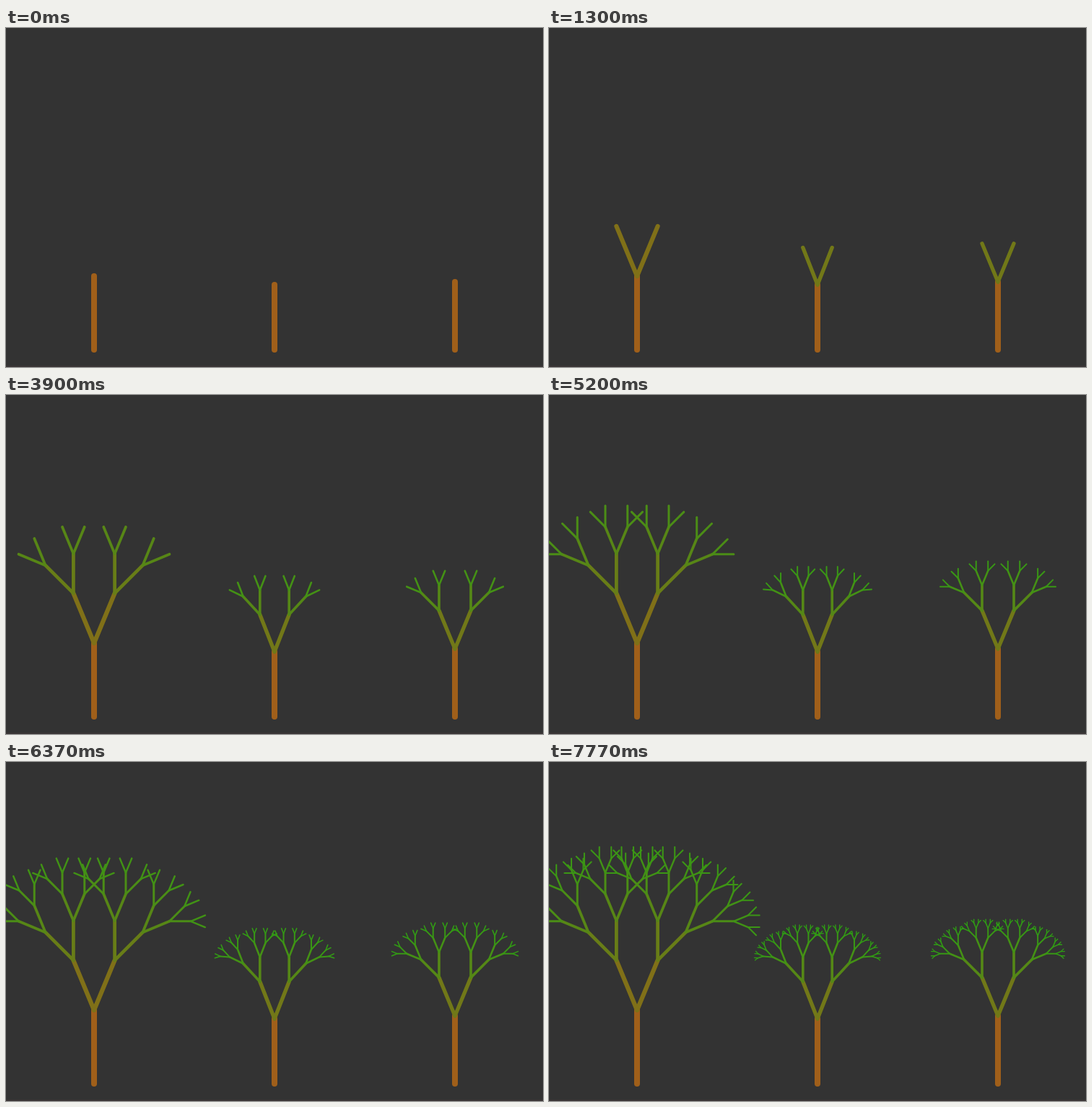
These frames come from a looping animation (744 by 470 pixels, 8000 ms). An HTML page with a canvas:

```html
<!DOCTYPE html>
<html>
<head>
<meta charset="utf-8">
<style>
html, body { margin: 0; width: 100%; height: 100%; overflow: hidden; background: #333; }
canvas { display: block; }
</style>
</head>
<body>
<canvas id="stage" width="744" height="470"></canvas>
<script>
const ctx = document.getElementById('stage').getContext('2d');
const LOOP = 8000;
const GROWTH = [0, 1300, 2600, 3900, 5200, 6370, 7770];
const TREES = [
  { x: 122, length: 102, ratio: 0.733, angle: 22.5 },
  { x: 372, length: 90, ratio: 0.615, angle: 21.4 },
  { x: 622, length: 94, ratio: 0.612, angle: 22.5 }
];

function drawTree({ x, length, ratio, angle }, levels) {
  const turn = angle * Math.PI / 180;
  let buds = [{ x, y: 446, a: 0 }];
  let size = 1; // branch length relative to the trunk
  for (let i = 0; i < levels; i++) {
    const next = [];
    ctx.strokeStyle = `rgb(${40 + 120 * size}, ${160 - 65 * size}, ${20 + 6 * size})`;
    ctx.lineWidth = 1 + 7 * size;
    for (const b of buds) {
      const tx = b.x + length * size * Math.sin(b.a);
      const ty = b.y - length * size * Math.cos(b.a);
      ctx.beginPath();
      ctx.moveTo(b.x, b.y);
      ctx.lineTo(tx, ty);
      ctx.stroke();
      next.push({ x: tx, y: ty, a: b.a - turn }, { x: tx, y: ty, a: b.a + turn });
    }
    buds = next;
    size *= ratio;
  }
}

const start = performance.now();

function frame() {
  const t = (performance.now() - start) % LOOP;
  const levels = GROWTH.filter(g => g <= t).length;
  ctx.fillStyle = '#333';
  ctx.fillRect(0, 0, 744, 470);
  ctx.fillStyle = '#393536';
  ctx.fillRect(0, 468, 744, 2);
  ctx.lineCap = 'round';
  TREES.forEach(tree => drawTree(tree, levels));
  requestAnimationFrame(frame);
}
frame();
</script>
</body>
</html>
```
